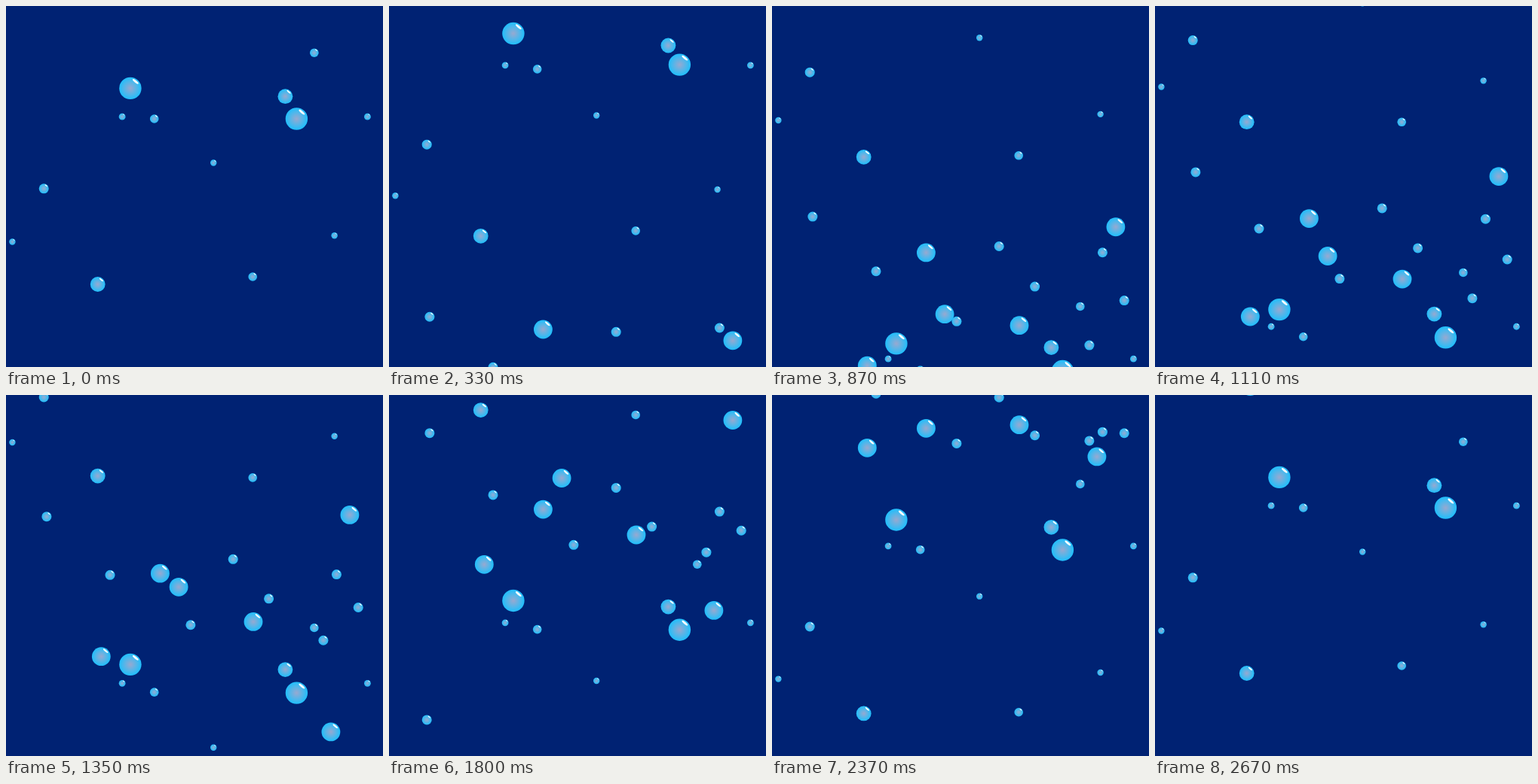
Recreate the animation shown at these times as an HTML page with a canvas. Size 500 px wide and 480 px high, loop 2.7 s.

```html
<!DOCTYPE html>
<html lang="en">
<head>
<meta charset="utf-8">
<title>Rising bubbles</title>
<style>
  html, body { margin: 0; width: 100%; height: 100%; overflow: hidden; background: #002273; }
  canvas { display: block; }
</style>
</head>
<body>
<canvas id="stage" width="500" height="480"></canvas>
<script>
const W = 500, H = 480, LOOP = 2700, STEP = 30, END = LOOP - STEP;
const ctx = document.getElementById('stage').getContext('2d');

// Each size rises from below the floor to above the ceiling, in ms of the loop.
// single: [x, enter, leave] - one trip inside the loop
// cyclic: [x, height at the seam, leave] - leaves, pauses below, and is back at that height by END
const sizes = [
  { r: 4.2, pause: 159, cyclic: [[275.2, 208.5, 1113], [8.4, 313.5, 1712], [435.6, 305.3, 1668]] },
  { r: 4.4, pause: 53, cyclic: [[154.1, 147.2, 732], [479.4, 147.2, 732]] },
  { r: 5.8, pause: 85, cyclic: [[408.8, 62.2, 324], [196.7, 150, 777], [327.2, 360, 1974]] },
  { r: 6.5, pause: 146, cyclic: [[50.2, 242.8, 1403]], single: [
    [53.9, 33, 2032], [138, 304, 2390], [244.9, 586, 2670], [301.2, 78, 2416],
    [348.6, 337, 2653], [420.9, 734, 2629], [438.4, 15, 2670], [467.2, 452, 2622]] },
  { r: 9.9, pause: 43, cyclic: [[370.4, 120.2, 634], [121.7, 370, 1954]] },
  { r: 12.4, single: [
    [126.3, 818, 2674], [204.4, 0, 2670], [229.1, 613, 2182],
    [328, 606, 2573], [430.9, 1226, 2633], [455.9, 160, 1964]] },
  { r: 14.7, pause: 65, cyclic: [[164.9, 109.4, 562], [385.4, 150, 756]] },
];

const shade = ctx.createRadialGradient(0, 0, 0, 0, 0, 1);
shade.addColorStop(0, '#98a9d0');
shade.addColorStop(1, '#1fbffc');

function ellipse(x, y, rx, ry, angle, fill) {
  ctx.fillStyle = fill;
  ctx.beginPath();
  ctx.ellipse(x, y, rx, ry, angle, 0, 2 * Math.PI);
  ctx.fill();
}

function bubble(x, y, r) {
  ctx.save();
  ctx.translate(x, y);
  ctx.scale(r, r);
  ellipse(0, 0, 1, 1, 0, shade);
  ellipse(0.47, -0.61, 0.33, 0.1, 0.7, '#fff');
  ctx.restore();
}

// Moves a bubble evenly from one height to another between two times
function rise(t, x, r, start, from, end, to) {
  if (t >= start && t <= end) bubble(x, from + (to - from) * (t - start) / (end - start), r);
}

function draw(now) {
  const t = Math.floor(now % LOOP / STEP) * STEP;
  ctx.fillStyle = '#002273';
  ctx.fillRect(0, 0, W, H);
  for (const { r, pause, cyclic = [], single = [] } of sizes) {
    for (const [x, y, leave] of cyclic) {
      rise(t, x, r, 0, y, leave, -r);
      rise(t, x, r, leave + pause, H + r, END, y);
    }
    for (const [x, enter, leave] of single) rise(t, x, r, enter, H + r, leave, -r);
  }
  requestAnimationFrame(draw);
}
requestAnimationFrame(draw);
</script>
</body>
</html>
```
